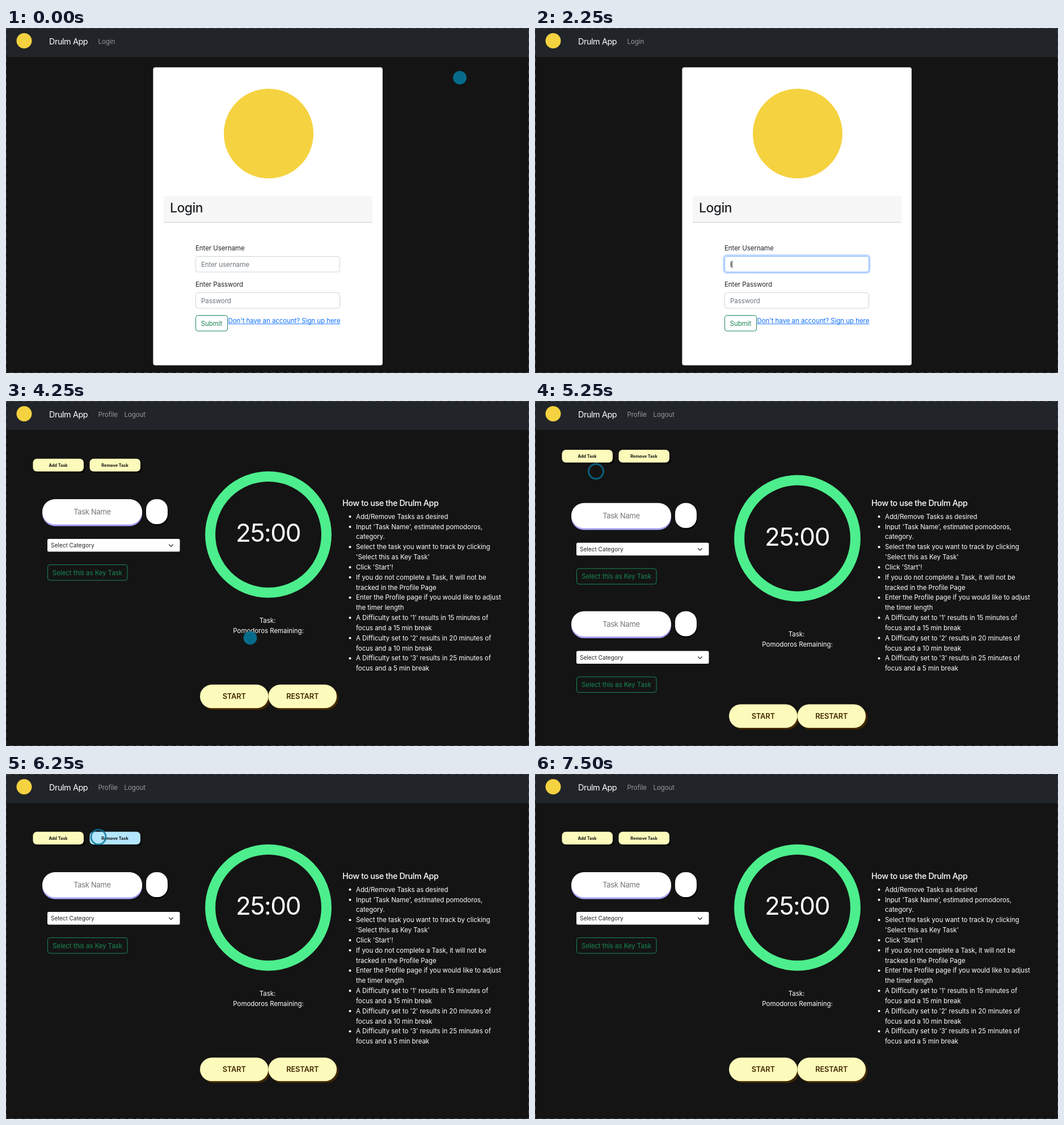
Recreate the animation shown at these times as an HTML page with a canvas. Size 922 px wide and 608 px high, loop 8 s.

```html
<!DOCTYPE html>
<html lang="en">
<head>
<meta charset="utf-8">
<title>Drulm App</title>
<style>
html, body { margin: 0; width: 100%; height: 100%; overflow: hidden; background: #141414; }
canvas { display: block; width: 922px; height: 608px; }
</style>
</head>
<body>
<canvas id="stage"></canvas>
<script>
const W = 922, H = 608, LOOP = 8000, STEP = 250;
const canvas = document.getElementById('stage');
const ctx = canvas.getContext('2d');
const ratio = window.devicePixelRatio || 1;
canvas.width = W * ratio;
canvas.height = H * ratio;

const GREEN = '#198754', BLUE = '#0d6efd', INK = '#212529', CREAM = '#fdfbbb', YELLOW = '#f5d23f';
const USER = 'lp', BODY = 11.5;

function text(str, x, y, color, { size = BODY, weight = 400, gap = -0.005, align = 'left' } = {}) {
  ctx.font = `${weight} ${size}px Inter, "Open Sans", sans-serif`;
  ctx.letterSpacing = `${gap * size}px`;
  ctx.textAlign = align;
  ctx.fillStyle = color;
  ctx.fillText(str, x, y);
  return ctx.measureText(str).width;
}

function box(x, y, w, h, r, fill, stroke, line = 1) {
  ctx.beginPath();
  ctx.roundRect(x, y, w, h, r);
  if (fill) { ctx.fillStyle = fill; ctx.fill(); }
  if (stroke) { ctx.strokeStyle = stroke; ctx.lineWidth = line; ctx.stroke(); }
}

function disc(x, y, r, fill) {
  ctx.beginPath();
  ctx.arc(x, y, r, 0, Math.PI * 2);
  ctx.fillStyle = fill;
  ctx.fill();
}

function ring(x, y, r, line, color) {
  ctx.beginPath();
  ctx.arc(x, y, r, 0, Math.PI * 2);
  ctx.lineWidth = line;
  ctx.strokeStyle = color;
  ctx.stroke();
}

function navbar(links) {
  ctx.fillStyle = '#212529';
  ctx.fillRect(0, 0, W, 51);
  disc(32, 22.5, 13.5, YELLOW);
  text('Drulm App', 76, 29, '#fff', { size: 14.35, gap: -0.028 });
  for (const [label, x] of links) text(label, x, 28, '#97999b');
}

function edge() {
  ctx.strokeStyle = '#4b4d4f';
  ctx.lineWidth = 1;
  ctx.setLineDash([8, 6]);
  ctx.strokeRect(0.5, 0.5, W - 1, H - 1);
  ctx.setLineDash([]);
}

function field(y, focus) {
  if (focus) box(332.6, y - 1.5, 257.4, 31, 5, null, `rgba(13,110,253,${0.25 * focus})`, 3);
  box(334.5, y + 0.5, 254, 27.5, 4, '#fff', focus ? '#86b7fe' : '#ced4da');
}

function caret(x, y) {
  ctx.fillStyle = '#222';
  ctx.fillRect(x, y, 1, 13);
}

function loginPage(s) {
  navbar([['Login', 162.5]]);
  box(259.3, 69.2, 404.7, 525.4, 4, '#fff');
  box(259.7, 69.6, 403.9, 524.6, 3.6, null, 'rgba(0,0,0,0.125)', 0.8);
  disc(463, 186, 79, YELLOW);

  ctx.fillStyle = '#f7f7f7';
  ctx.fillRect(278, 296, 368, 46.5);
  ctx.fillStyle = '#d0d0d0';
  ctx.fillRect(278, 342, 368, 1);
  text('Login', 289, 325, INK, { size: 22.9, weight: 500, gap: -0.022 });

  text('Enter Username', 334, 392, INK);
  field(402, s.userFocus);
  if (s.typed) {
    const w = text(USER.slice(0, s.typed), 344, 421, INK);
    if (s.userFocus) caret(344 + w, 410);
  } else {
    text('Enter username', 344, 421, '#6c757d');
    if (s.userFocus === 1) caret(343.5, 410);
  }

  text('Enter Password', 334, 456, INK);
  field(466, s.passFocus);
  if (s.dots) for (let i = 0; i < s.dots; i++) disc(346.3 + i * 5.4, 481, 1.35, INK);
  else text('Password', 344, 485, '#6c757d');
  if (s.passCaret) caret(344 + s.dots * 5.4, 474);

  box(334.5, 506.5, 56, 27.5, 4, null, GREEN);
  text('Submit', 362.5, 525, GREEN, { align: 'center' });
  const w = text("Don't have an account? Sign up here", 391.5, 519.5, BLUE);
  ctx.fillStyle = BLUE;
  ctx.fillRect(391.5, 521, w, 0.9);
}

function smallButton(label, x, y, hot) {
  box(x + 2.5, y + 2.5, 89.5, 22.5, 7, '#000');
  box(x, y, 89.5, 22.5, 7, hot ? '#b5e6ff' : CREAM);
  text(label, x + 44.5, y + 14, '#111', { size: 7.3, weight: 700, gap: 0, align: 'center' });
}

function pillButton(label, x, y) {
  box(x + 3, y + 3, 120.5, 41.5, 21, '#422800');
  box(x, y, 120.5, 41.5, 21, CREAM);
  text(label, x + 60.3, y + 25, '#422800', { size: 12.9, weight: 600, gap: -0.01, align: 'center' });
}

function taskForm(y) {
  box(64, y + 3, 176, 44.5, 23, '#a8a2fb');
  box(64, y, 176, 44.5, 23, '#fff');
  text('Task Name', 152, y + 27, '#757575', { size: 12.9, gap: -0.02, align: 'center' });
  box(248, y + 2.5, 38, 44, 18, '#000');
  box(247, y, 38, 44, 18, '#fff');

  box(73, y + 70, 233.5, 22.5, 2.5, '#fff');
  text('Select Category', 79, y + 85.3, INK, { size: 10.1, gap: 0 });
  ctx.beginPath();
  ctx.moveTo(287.3, y + 79.8);
  ctx.lineTo(291, y + 83.4);
  ctx.lineTo(294.7, y + 79.8);
  ctx.lineWidth = 1.4;
  ctx.strokeStyle = '#343a40';
  ctx.stroke();

  box(73.5, y + 115.5, 140.5, 27.5, 4, null, GREEN);
  text('Select this as Key Task', 143.5, y + 133.5, GREEN, { align: 'center' });
}

const HELP = [
  '*Add/Remove Tasks as desired',
  "*Input 'Task Name', estimated pomodoros,", 'category.',
  '*Select the task you want to track by clicking', "'Select this as Key Task'",
  "*Click 'Start'!",
  '*If you do not complete a Task, it will not be', 'tracked in the Profile Page',
  '*Enter the Profile page if you would like to adjust', 'the timer length',
  "*A Difficulty set to '1' results in 15 minutes of", 'focus and a 15 min break',
  "*A Difficulty set to '2' results in 20 minutes of", 'focus and a 10 min break',
  "*A Difficulty set to '3' results in 25 minutes of", 'focus and a 5 min break'
];

function timerPage(s) {
  const two = s.tasks === 2;
  navbar([['Profile', 162.5], ['Logout', 208.5]]);

  const top = two ? 86 : 101.8;
  smallButton('Add Task', 47.5, top, s.hot === 'add');
  smallButton('Remove Task', 147.5, top, s.hot === 'remove');
  const form = two ? 179.8 : 173;
  for (let i = 0; i < s.tasks; i++) taskForm(form + i * 190.8);

  const cy = two ? 242 : 235.4;
  ring(462.5, cy, 102.4, 18, '#4dee8d');
  text('25:00', 462, cy + 12.8, '#fff', { size: 44, gap: -0.033, align: 'center' });

  const info = two ? 415.2 : 391.3;
  text('Task:', 461, info, '#fff', { align: 'center' });
  text('Pomodoros Remaining:', 462.5, info + 17.8, '#fff', { align: 'center' });
  const bottom = two ? 534.5 : 499.8;
  pillButton('START', 342, bottom);
  pillButton('RESTART', 462.5, bottom);

  text('How to use the Drulm App', 593, 185, '#fff', { size: 14.35, weight: 500, gap: -0.028 });
  HELP.forEach((line, i) => {
    const y = 207.8 + i * 17.83;
    if (line[0] === '*') disc(606.5, y - 4, 2, '#fff');
    text(line.replace('*', ''), 617, y, '#fff');
  });
}

// Pointer keys: time, x, y
const PATHS = [
  [[0, 800, 87.7], [250, 768, 150], [500, 650, 300], [750, 510, 398], [1000, 440, 422]],
  [[4250, 430.5, 417.5], [4500, 290, 290], [4750, 150, 155], [5000, 107.5, 124]],
  [[5750, 128, 118], [6000, 163, 111]]
];
// Clicks: time, x, y, final opacity
const CLICKS = [[1250, 440, 428, 0.4], [5250, 107.5, 124, 0.5], [6250, 163, 111, 0.28]];

function pointer(t) {
  for (const path of PATHS) {
    const key = path.find(k => k[0] === t);
    if (key) disc(key[1], key[2], 11.9, 'rgba(5,115,150,0.92)');
  }
  for (const [start, x, y, fade] of CLICKS) {
    if (t === start) ring(x, y, 13, 3, 'rgba(5,115,150,0.8)');
    if (t === start + STEP) ring(x, y, 14.3, 2, `rgba(5,115,150,${fade})`);
  }
}

function stateAt(t) {
  const typing = Math.max(0, Math.floor((t - 2750) / STEP));
  return {
    userFocus: t < 1250 || t >= 2750 ? 0 : t < 1500 ? 0.3 : 1,
    passFocus: t >= 2750 ? 1 : 0,
    passCaret: t >= 2750 && t < 4000,
    typed: t < 2250 ? 0 : t < 2500 ? 1 : 2,
    dots: typing ? Math.min(5, typing * 2 - 1) : 0,
    tasks: t >= 5250 && t < 6250 ? 2 : 1,
    hot: t === 5000 ? 'add' : t >= 6000 && t < 7000 ? 'remove' : ''
  };
}

function draw(now) {
  const t = Math.floor((now % LOOP) / STEP) * STEP;
  const s = stateAt(t);
  ctx.setTransform(ratio, 0, 0, ratio, 0, 0);
  ctx.fillStyle = '#141414';
  ctx.fillRect(0, 0, W, H);
  (t < 4250 ? loginPage : timerPage)(s);
  edge();
  pointer(t);
}

let begin;
function tick(now) {
  begin ??= now;
  draw(now - begin);
  requestAnimationFrame(tick);
}
draw(0);
requestAnimationFrame(tick);
</script>
</body>
</html>
```
